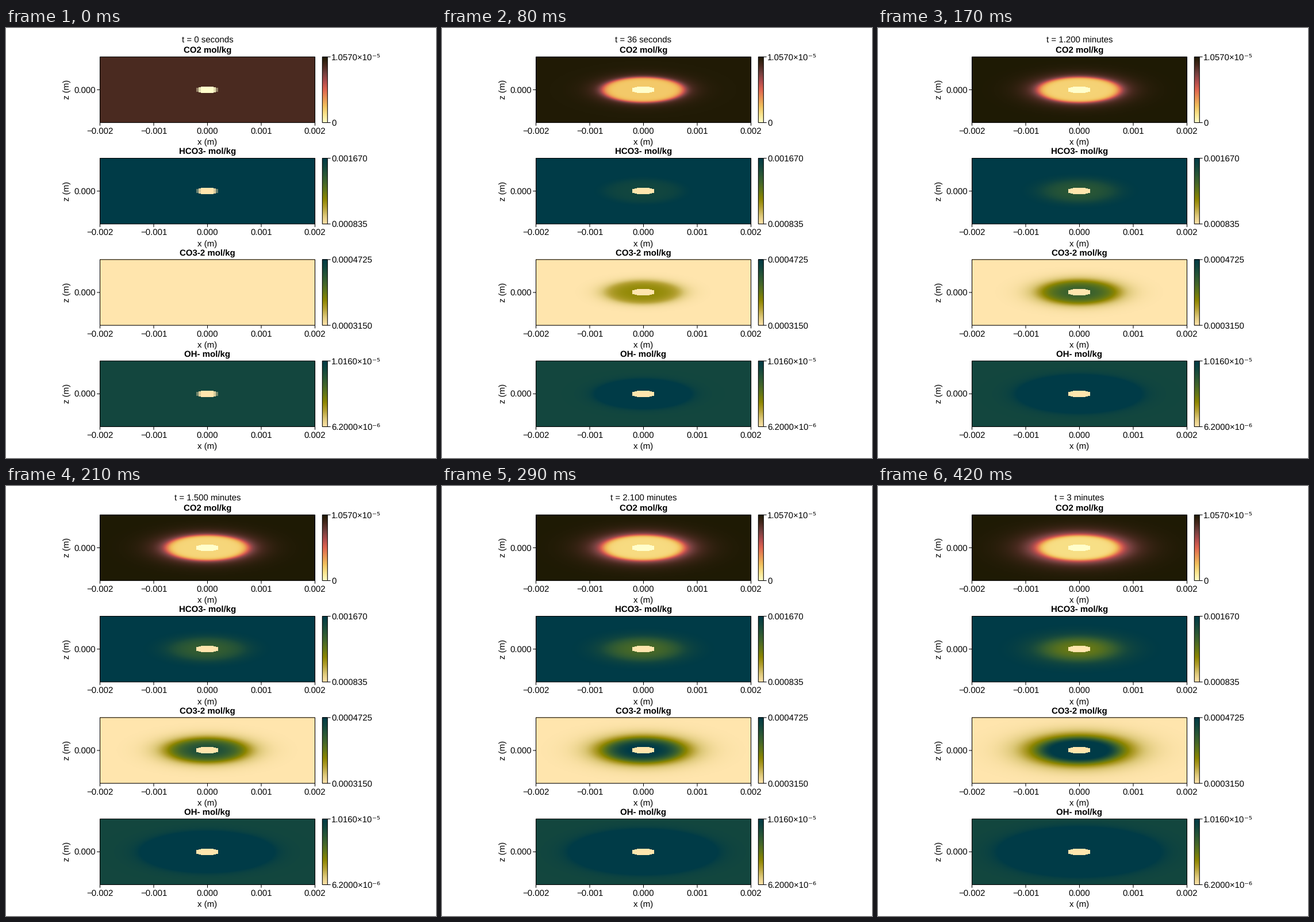
A matplotlib script for the animation above (0.46 s loop, 748 by 748 pixels).

```python
import numpy as np
import matplotlib
import matplotlib.pyplot as plt
from matplotlib.animation import FuncAnimation
from matplotlib.colors import LinearSegmentedColormap
from matplotlib.patches import Rectangle

matplotlib.rcParams["font.family"] = "Liberation Sans"
matplotlib.rcParams["text.hinting"] = "none"

SIZE, DPI = 748, 100
U = SIZE / 700                    # layout unit in pixels
WIDTH = U * 72 / DPI              # line width in points
FONT = 14 * U * 72 / DPI
LEFT, RIGHT, HEIGHT = 153 * U, 503 * U, 107 * U
TOP, PITCH = 47 * U, 165 * U
MID = (LEFT + RIGHT) / 2
BAR_L, BAR_R = 515 * U, 523.4 * U
TICK = 5 * U

TICK_MS = 10
LOOP_MS = 460
STARTS = [0, 40, 80, 130, 170, 210, 250, 290, 330, 380, 420]
STEP_S = 18
CELLS = 100
BUBBLE = 0.21

ember = LinearSegmentedColormap.from_list("ember", [
    "#FFFECB", "#F9E58E", "#F2C15E", "#E99354", "#DF6550",
    "#B04C4D", "#75403F", "#47291E", "#1E1A04"], 512)
moss = LinearSegmentedColormap.from_list("moss", [
    "#FFE5AD", "#DDC878", "#B5A133", "#8D8600", "#647717",
    "#43662A", "#295636", "#12463F", "#003B47"], 512)

PANELS = [
    ("CO2 mol/kg", ember, "1.0570×10", "⁻⁵", "0", ""),
    ("HCO3- mol/kg", moss, "0.001670", "", "0.000835", ""),
    ("CO3-2 mol/kg", moss, "0.0004725", "", "0.0003150", ""),
    ("OH- mol/kg", moss, "1.0160×10", "⁻⁵", "6.2000×10", "⁻⁶"),
]

# Cell centres in millimetres
axis = (np.arange(CELLS) + 0.5) / CELLS * 4 - 2
X, Z = np.meshgrid(axis, axis)
R = np.hypot(X, Z)
INSIDE = (R < BUBBLE).astype(float)


def diffuse(source=0.0101, radius=0.72, d=1.1e-3, dr=0.025, dt=0.2):
    """Radial diffusion from a disc that produces at a steady rate."""
    r = (np.arange(140) + 0.5) * dr
    face = np.arange(141) * dr
    rate = source * 0.5 * (1 - np.tanh((r - radius) / 0.04))
    u = np.zeros_like(r)
    grids = [np.zeros_like(R)]
    for _ in STARTS[1:]:
        for _ in range(round(STEP_S / dt)):
            flux = np.zeros_like(face)
            flux[1:-1] = face[1:-1] * np.diff(u) / dr
            u = u + dt * (d * np.diff(flux) / (r * dr) + rate)
        grids.append(np.interp(R, r, u))
    return grids


def carbon_dioxide(t):
    root = np.sqrt(t / 180)
    far = 1 - 0.13 * np.exp(-t / 13)
    core = 0.13 + 0.14 * np.exp(-t / 80)
    share, reach = 0.2 + 0.4 * root, 0.1 + 0.2 * root
    step = 0.5 * (1 - np.tanh((R - 0.75) / 0.09))
    beyond = 0.07 * np.log1p(np.exp((R - 0.75) / 0.07))
    drop = (1 - share) * step + share * np.exp(-beyond / reach)
    return far - (far - core) * drop


def hydroxide(t):
    full = 0.62 + 0.39 * np.log(t / STEP_S)
    reach = 0.08 + 0.12 * np.sqrt(t / 180)
    return 0.868 + 0.132 * np.exp(-np.maximum(R - full, 0) / reach)


def fields(step, made):
    t = step * STEP_S
    if step == 0:
        return [np.full_like(R, level) for level in (0.865, 1, 0, 0.868)]
    return [carbon_dioxide(t),
            1 - np.maximum(0.4 * made - 0.015, 0),
            made,
            hydroxide(t)]


def bubble_alpha(step):
    # The bubble starts with soft sides
    if step == 0:
        return INSIDE * np.interp(np.abs(X), [0.11, 0.14, 0.18], [1, 0.85, 0.4])
    return INSIDE


def clock(step):
    t = step * STEP_S
    if t < 60:
        return f"t = {t} seconds"
    if t % 60 == 0:
        return f"t = {t // 60} minutes"
    return f"t = {t / 60:.3f} minutes"


fig = plt.figure(figsize=(SIZE / DPI, SIZE / DPI), dpi=DPI, facecolor="white")
ax = fig.add_axes([0, 0, 1, 1])
ax.axis("off")


def label(x, y, text, ha="center", **kw):
    kw.setdefault("va", "baseline")
    return ax.text(x, y, text, ha=ha, fontsize=FONT, color="black", **kw)


def line(x, y):
    ax.plot(x, y, color="black", lw=WIDTH, solid_capstyle="butt",
            snap=False, zorder=3)


def picture(data, x0, x1, top, smooth="bilinear", **kw):
    return ax.imshow(data, vmin=0, vmax=1, origin="lower",
                     extent=(x0, x1, top + HEIGHT, top), aspect="auto",
                     interpolation=smooth, **kw)


def frame(x0, x1, top):
    ax.add_patch(Rectangle((x0, top), x1 - x0, HEIGHT, fill=False, ec="black",
                           lw=WIDTH, joinstyle="miter", snap=False, zorder=3))


def bar_label(y, text, power):
    line([BAR_R, BAR_R + TICK], [y, y])
    label(566.3, y + 5.2, text, "left")
    if power:
        label(637.4, y + 5.2, power, "left", family="DejaVu Sans")


def panel(top, title, cmap, high, high_pow, low, low_pow):
    bottom = top + HEIGHT
    image = picture(np.zeros_like(R), LEFT, RIGHT, top, cmap=cmap, zorder=1)
    rgba = np.empty(R.shape + (4,))
    rgba[:] = cmap(0.0)
    bubble = picture(rgba, LEFT, RIGHT, top, "nearest", zorder=2)
    frame(LEFT, RIGHT, top)
    label(MID, top - 6.4, title, weight="bold")
    for k in range(5):
        x = LEFT + (RIGHT - LEFT) * k / 4
        line([x, x], [bottom, bottom + TICK])
        value = f"{(k - 2) / 1000:.3f}".replace("-", "−")
        label(x, bottom + 19.3, value)
    label(MID, bottom + 38.6, "x (m)")
    middle = top + HEIGHT / 2
    line([LEFT - TICK, LEFT], [middle, middle])
    label(156, middle + 5, "0.000", "right")
    label(106.3, middle, "z (m)", rotation=90, va="center")

    picture(np.linspace(0, 1, 256)[:, None], BAR_L, BAR_R, top,
            cmap=cmap, zorder=1)
    frame(BAR_L, BAR_R, top)
    bar_label(top, high, high_pow)
    bar_label(bottom, low, low_pow)
    return image, bubble, rgba


panels = [panel(TOP + PITCH * i, *spec) for i, spec in enumerate(PANELS)]
time_text = label(MID, 26.2, "")
ax.set_xlim(0, SIZE)
ax.set_ylim(SIZE, 0)

states = [fields(k, made) for k, made in enumerate(diffuse())]


def draw(i):
    step = int(np.searchsorted(STARTS, i * TICK_MS, side="right")) - 1
    alpha = bubble_alpha(step)
    for (image, bubble, rgba), data in zip(panels, states[step]):
        image.set_data(np.clip(data, 0, 1))
        rgba[..., 3] = alpha
        bubble.set_data(rgba)
    time_text.set_text(clock(step))
    return [time_text]


anim = FuncAnimation(fig, draw, frames=LOOP_MS // TICK_MS, interval=TICK_MS,
                     repeat=True, repeat_delay=0, blit=False)
plt.show()
```
